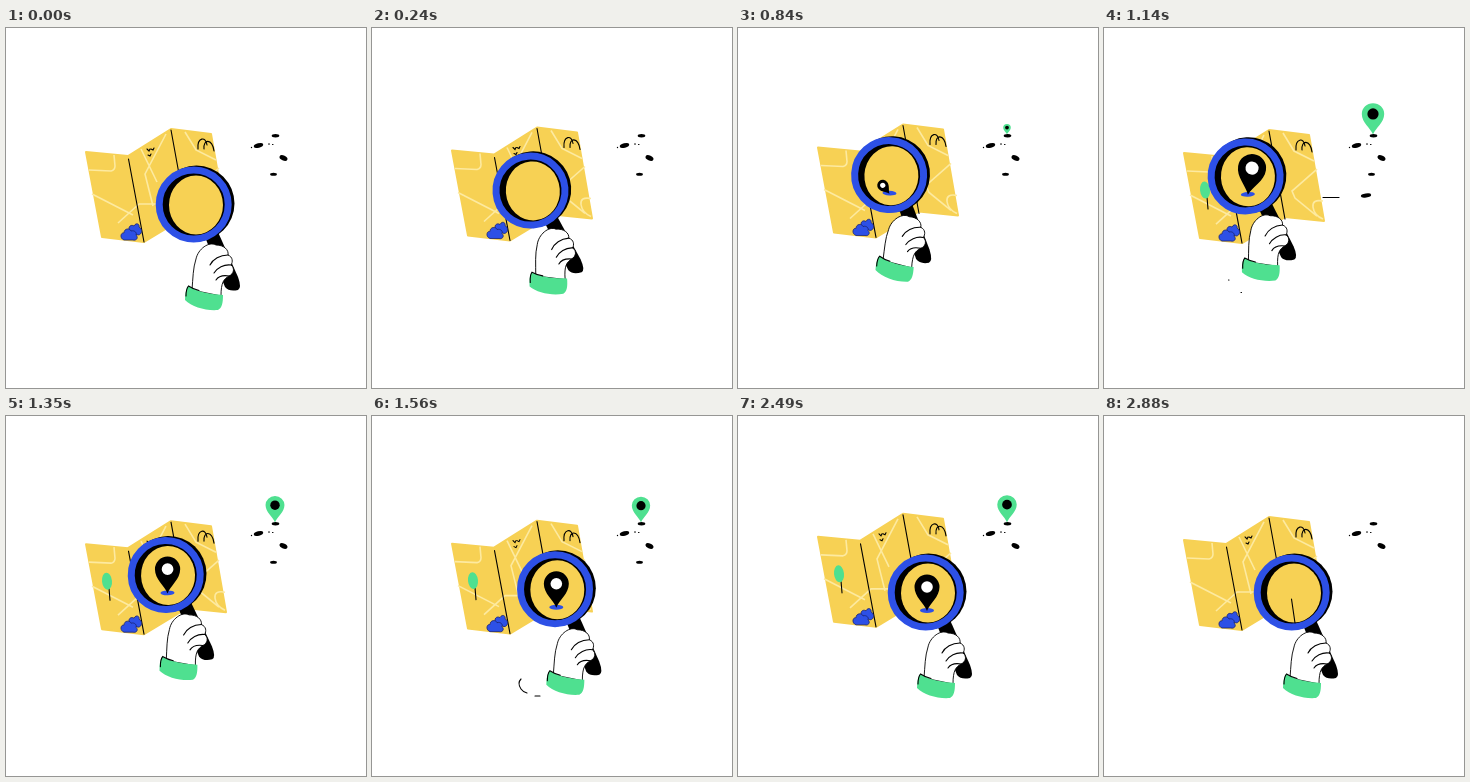
Write an HTML page that moves like this. It is 360 px wide and 360 px high and loops after 2.91 s.

```html
<!DOCTYPE html>
<html lang="en">
<head>
<meta charset="utf-8">
<title>Map search</title>
<style>
  html, body { margin: 0; height: 100%; overflow: hidden; background: #fff; }
  svg { display: block; width: 100%; height: 100%; }
  .road { fill: none; stroke: #fdeaa0; stroke-width: 1.6; }
  .ink { fill: none; stroke: #000; stroke-width: 1.1; stroke-linecap: round; }
  .sun { fill: #f7d154; }
  .blue { fill: #2d50e6; }
  .green { fill: #4fe090; }
</style>
</head>
<body>
<svg viewBox="0 0 360 360">
  <defs>
    <!-- tip at the origin, head 24 above -->
    <path id="drop" d="M0 0C-3 -8 -12.5 -14 -12.5 -24A12.5 12.5 0 0 1 12.5 -24C12.5 -14 3 -8 0 0Z"/>
  </defs>

  <g id="map">
    <path class="sun" stroke="#f7d154" stroke-width="2" stroke-linejoin="round"
      d="M80 124L122 128L165 101L205 106L220 192L181 188L138 214L96 209Z"/>
    <path class="road" d="M83 142L105 143Q109 142 109 138L108 127M86 166L127 187M112 195L133 176L152 176
      M135 121L151 154M160 106L139 146L147 178M179 104L190 122L210 132M213 140L188 162L191 169L213 187M219 172Q208 170 209 178Q210 186 219 190"/>
    <path class="ink" d="M122.500 131L138 214M165 102L181 190"/>
    <path class="ink" d="M192 121C191 109 200 108 201 117M198 121C197 111 206 110 208 123"/>
    <path class="ink" d="M141 121l2 2 1-2M145 121l2 1 1-2M142 127l2 1 1-2"/>
    <g class="blue" stroke="#1a2470" stroke-width=".8">
      <path d="M124 204C121 199 125 196 128 198C130 194 134 196 133 199C137 201 136 207 132 207Z"/>
      <path d="M118 212C113 210 115 204 118 205C118 200 124 200 125 203C129 202 131 205 130 207C133 210 130 213 127 212Z"/>
    </g>
    <g id="tree">
      <path class="ink" d="M-2 -24L0 0"/>
      <ellipse class="green" cx="-3" cy="-19" rx="5" ry="8.500" transform="rotate(-6 -3 -19)"/>
    </g>
  </g>

  <g id="glass">
    <path d="M199 209L212 204L232 249Q236 260 232 262Q223 264 219 259Z"/>
    <circle cx="190.500" cy="175.500" r="38"/>
    <ellipse class="sun" cx="190" cy="177" rx="27" ry="29.500"/>
    <circle cx="187.700" cy="176.500" r="34.500" fill="none" stroke="#2d50e6" stroke-width="7"/>
    <path id="crease" class="ink" d="M187.500 183L191 207"/>
    <ellipse id="shade" class="blue" cx="189" cy="194.500" rx="7" ry="2.400"/>
    <g id="pin">
      <use href="#drop"/>
      <circle cy="-24" r="5.800" fill="#fff"/>
    </g>
    <path fill="#fff" stroke="#000" stroke-width=".9"
      d="M186 262C187 250 187 240 190 231C192 221 203 213 210 217C218 217 223 222 222 227C227 229 227 234 225 237C229 240 228 246 223 248C218 251 215 254 215 268Z"/>
    <path class="ink" d="M222 227C214 227 207 231 204 237M225 237C218 236 211 240 208 245M223 248C217 247 212 249 210 252"/>
    <path class="green" d="M182 258C194 265 205 266 217 267C217 275 216 280 212 282C200 283 186 279 179 272C179 266 180 261 182 258Z"/>
    <path class="ink" d="M180 268Q180 261 182.500 258Q187 261 193 262.500"/>
  </g>

  <g id="marker">
    <use href="#drop" class="green" transform="scale(.72 .69)"/>
    <circle cy="-16.500" r="4.500"/>
  </g>

  <ellipse cx="252.500" cy="117.500" rx="4.800" ry="2.200" transform="rotate(-14 252.500 117.500)"/>
  <circle cx="245.500" cy="119.500" r=".7"/>
  <ellipse cx="277.500" cy="130" rx="4.200" ry="2.500" transform="rotate(25 277.500 130)"/>
  <g id="base">
    <ellipse cx="269.500" cy="107.800" rx="3.800" ry="1.700"/>
    <path class="ink" d="M262.500 116h1M266.500 116.500h.5"/>
  </g>
  <ellipse id="step" cx="267.500" cy="146.300" rx="3.400" ry="1.500"/>
  <ellipse id="stride" cx="262" cy="167.500" rx="5.200" ry="2" transform="rotate(-8 262 167.500)"/>
  <path id="dash" class="ink" d="M219 169.500H235"/>
  <path id="curl" class="ink" d="M139 268L145 270M146 270A5.500 5.500 0 1 1 155 271M145 271L150 273"/>
  <path id="specks" class="ink" d="M124.500 252h.5M137 264.500h.5"/>
  <path id="arc" class="ink" d="M149 263Q145 267 149 273Q151 276 155 277M163 280h5"/>
</svg>
<script>
const LOOP = 2910;
const $ = id => document.getElementById(id);

// Eased value at t along [time, value] keys
function ease(t, keys) {
  let [t0, v0] = keys[0];
  for (const [t1, v1] of keys) {
    if (t < t1) {
      const p = Math.max(0, (t - t0) / (t1 - t0));
      return v0 + (v1 - v0) * p * p * (3 - 2 * p);
    }
    [t0, v0] = [t1, v1];
  }
  return v0;
}

const within = (t, a, b) => t >= a && t < b;
const move = (id, value) => $(id).setAttribute('transform', value);
const show = (id, on) => $(id).style.display = on ? '' : 'none';

function draw(t) {
  const lift = ease(t, [[0, 0], [700, -5.5], [1430, 4.5], [2150, -5.5], [LOOP, 0]]);
  move('map', `translate(0 ${lift})`);

  const tree = ease(t, [[880, 0], [1120, 1], [2720, 1], [2870, 0]]);
  move('tree', `translate(104 180) scale(${tree})`);

  const slide = ease(t, [[0, 0], [470, 1], [1110, 1], [1680, 0]]);
  const swing = ease(t, [[0, 0], [470, -9], [830, 3], [1140, -3], [1560, 0]]);
  move('glass', `translate(${-41.5 * slide} ${-29 * slide}) rotate(${swing} 198 271)`);

  const pin = ease(t, [[640, 0], [1110, 1.13], [1400, 1], [2700, 1], [2865, 0]]);
  const tilt = ease(t, [[660, -70], [1120, 12], [1420, 0]]);
  move('pin', `translate(189 195) rotate(${tilt}) scale(${pin})`);
  show('shade', within(t, 760, 2820));
  show('crease', t >= 2850);

  const marker = ease(t, [[670, 0], [1110, 1.25], [1450, 1], [1700, 1.05], [2500, 1.08], [2720, 1.04], [2870, 0]]);
  const blink = within(t, 2070, 2150);
  move('marker', `translate(269 106.5) scale(${marker})`);
  show('marker', !blink);
  show('base', !blink);

  show('step', t < 2070);
  show('stride', within(t, 1050, 1260));
  show('dash', within(t, 420, 600) || within(t, 1020, 1290));
  show('curl', within(t, 420, 570));
  show('specks', within(t, 1080, 1230));
  show('arc', within(t, 1470, 1650));
}

const start = performance.now();
function tick() {
  draw((performance.now() - start) % LOOP);
  requestAnimationFrame(tick);
}
tick();
</script>
</body>
</html>
```
